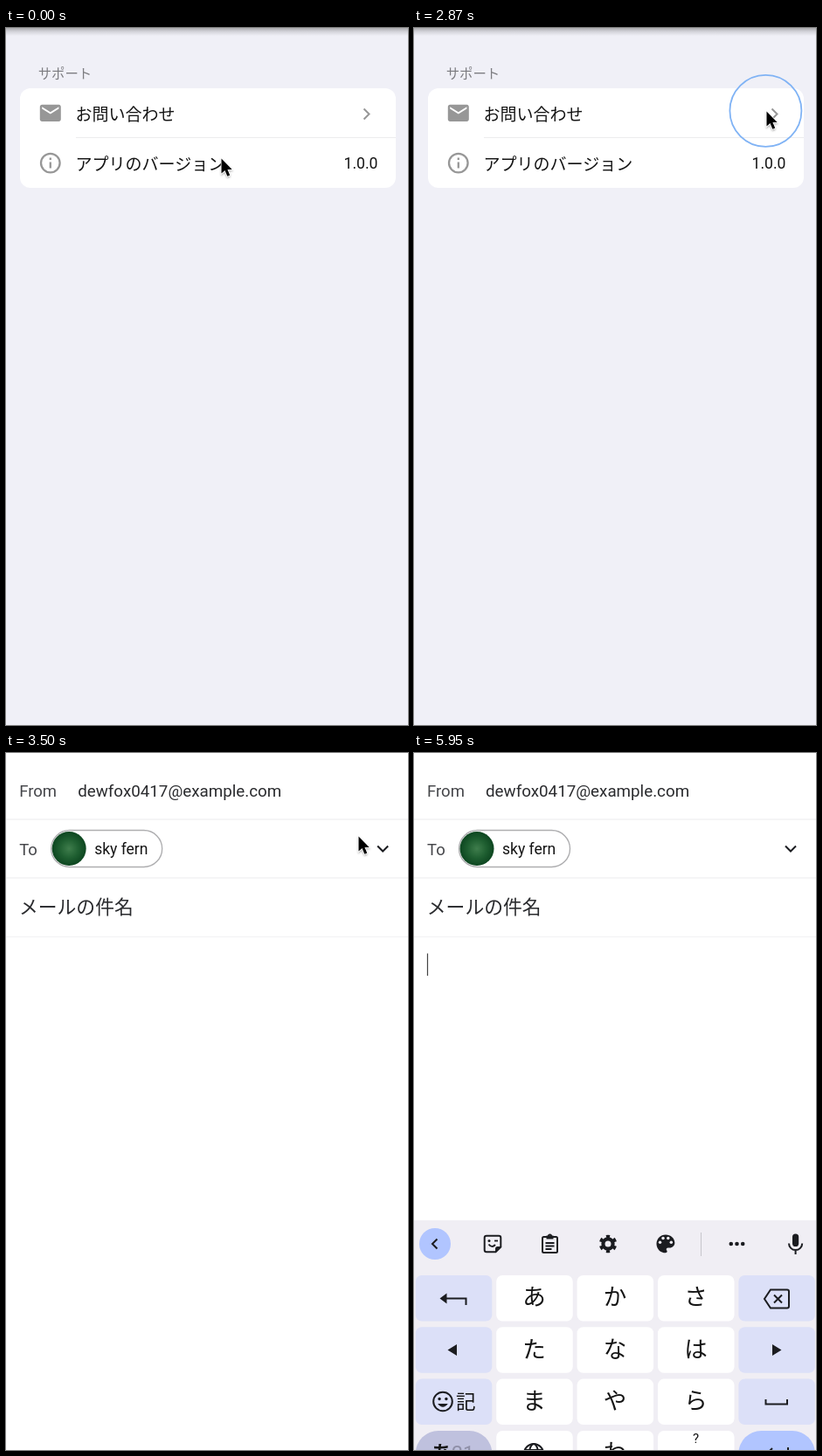
Recreate the animation shown at these times as an HTML page. Size 460 by 798 pixels, loop 6.02 s.

```html
<!DOCTYPE html>
<html lang="ja">
<head>
<meta charset="utf-8">
<title>お問い合わせ</title>
<style>
html, body { margin: 0; width: 100%; height: 100%; overflow: hidden; background: #fff; }
svg { display: block; width: 100%; height: 100%; }
text { font-family: Roboto, "Noto Sans CJK JP", "Noto Sans CJK", sans-serif; fill: #141414; }
.ink { fill: #1b1c20; }
.pen { fill: none; stroke: #1b1c20; stroke-width: 2; }
</style>
</head>
<body>
<svg viewBox="0 0 460 798" xmlns="http://www.w3.org/2000/svg">
  <defs>
    <linearGradient id="shade" x2="0" y2="1">
      <stop offset="0" stop-color="#a9a9ad"/>
      <stop offset=".45" stop-color="#d3d3d9"/>
      <stop offset="1" stop-color="#f0f0f7"/>
    </linearGradient>
    <radialGradient id="green">
      <stop offset="0" stop-color="#3f7d4c"/>
      <stop offset=".55" stop-color="#1f5f31"/>
      <stop offset="1" stop-color="#0d4620"/>
    </radialGradient>
    <filter id="soft" x="-50%" y="-50%" width="200%" height="200%">
      <feDropShadow dx="0" dy="1.5" stdDeviation="1.2" flood-opacity=".35"/>
    </filter>
  </defs>

  <rect width="460" height="798" fill="#d9d8e4"/>

  <g id="settings">
    <rect width="465" height="798" fill="#f0f0f7"/>
    <rect width="465" height="9" fill="url(#shade)"/>
    <text x="36.7" y="57.5" font-size="15.4" style="fill:#7c7c80">サポート</text>
    <rect x="16" y="69" width="430" height="114" rx="12" fill="#fff"/>
    <path d="M80 125.5H446" stroke="#ececee"/>
    <path transform="translate(36.4 83) scale(1.2)" fill="#979797"
      d="M20 4H4C2.9 4 2 4.9 2 6v12c0 1.1.9 2 2 2h16c1.1 0 2-.9 2-2V6c0-1.1-.9-2-2-2zm0 4l-8 5-8-5V6l8 5 8-5z"/>
    <g fill="none" stroke="#979797" stroke-width="2.3">
      <circle cx="50.8" cy="154.6" r="10.8"/>
      <path d="M50.8 153.4v7.2M50.8 148.6v2.4"/>
      <path d="M409.5 92.5l6 6-6 6" stroke-width="2"/>
    </g>
    <text x="79.6" y="106" font-size="19">お問い合わせ</text>
    <text x="79.6" y="163" font-size="19">アプリのバージョン</text>
    <text x="425.5" y="161" font-size="17.6" text-anchor="end">1.0.0</text>
  </g>

  <g id="mail">
    <rect width="460" height="798" fill="#fff"/>
    <g id="form">
      <path d="M0 76H460M0 143H460" stroke="#ebebed"/>
      <path d="M0 210.5H460" stroke="#f2f2f3"/>
      <text x="15" y="50" font-size="18.5" style="fill:#45464a">From</text>
      <text x="82" y="50" font-size="18.8" style="fill:#2a2b2e">dewfox0417@example.com</text>
      <text x="15" y="117" font-size="18.5" style="fill:#45464a">To</text>
      <rect x="51.5" y="88.5" width="127" height="42" rx="21" fill="#fff" stroke="#aeaeb0" stroke-width="1.4"/>
      <circle cx="72" cy="109.5" r="19.5" fill="url(#green)"/>
      <text x="101" y="115.5" font-size="17.5">sky fern</text>
      <path d="M425 106.5l6 6 6-6" class="pen"/>
      <text x="14.8" y="184" font-size="21.8" style="fill:#2a2b2e">メールの件名</text>
      <path id="caret" d="M15.5 229.5V255" stroke="#444" stroke-width="1.2"/>
    </g>
    <g id="board">
      <rect y="535" width="460" height="263" fill="#f0eef4"/>
      <circle cx="24" cy="562" r="18" fill="#b1c5ff"/>
      <path d="M26.5 556.5l-5.500 5.500 5.500 5.500" class="pen"/>
      <g transform="translate(90 562)" class="pen">
        <path d="M-7-9.300H7q2.300 0 2.300 2.300V3.500L3.500 9.300H-7q-2.300 0-2.300-2.300V-7q0-2.300 2.300-2.300z"/>
        <path d="M9.300 3H5.500Q3 3 3 5.500V9.300z" class="ink" stroke="none"/>
        <path d="M-4.500 .5Q-1 5 3 1" stroke-width="2"/>
        <path d="M2-3.500h4" stroke-width="1.800"/>
        <circle cx="-4" cy="-3.500" r="1.500" class="ink" stroke="none"/>
      </g>
      <g transform="translate(155.500 562)" class="pen">
        <rect x="-8.500" y="-8" width="17" height="18" rx="1.500"/>
        <path d="M-4-7.500h8" stroke-width="4"/>
        <circle cy="-9" r="1.500"/>
        <path d="M-5-1H5M-5 2.500H5M-5 6H2" stroke-width="1.800"/>
      </g>
      <g transform="translate(222 562)" class="pen">
        <circle r="5.600" stroke-width="4.200"/>
        <circle r="8.400" stroke-width="3.800" pathLength="60" stroke-dasharray="4.600 5.400" stroke-dashoffset="-2.700"/>
      </g>
      <g transform="translate(274 548) scale(1.16)">
        <path class="ink" d="M12 3c-4.970 0-9 4.030-9 9s4.030 9 9 9c.83 0 1.500-.67 1.500-1.500 0-.39-.15-.74-.39-1.010-.23-.26-.38-.61-.38-.99 0-.83.67-1.500 1.500-1.500H16c2.760 0 5-2.240 5-5 0-4.420-4.030-8-9-8z"/>
        <g fill="#f0eef4">
          <circle cx="6.500" cy="10.500" r="1.500"/><circle cx="9.500" cy="6.500" r="1.500"/>
          <circle cx="14.500" cy="6.500" r="1.500"/><circle cx="17.500" cy="10.500" r="1.500"/>
        </g>
      </g>
      <path d="M328.500 549v27" stroke="#c6c5cb"/>
      <g class="ink">
        <circle cx="362.800" cy="562" r="2.300"/><circle cx="369.500" cy="562" r="2.300"/><circle cx="376.200" cy="562" r="2.300"/>
        <rect x="433" y="550.500" width="7.200" height="14.500" rx="3.600"/>
      </g>
      <path d="M429 561.500a7.600 7.600 0 0 0 15.200 0M436.600 569v5" class="pen"/>
      <g id="keys"></g>
      <path d="M34 624.500H59.500v7.500" class="pen"/>
      <path class="ink" d="M29.500 624.500l8-6v12zM38.500 683.500l10.500-6.500v13zM420.500 683.500l-10.500-6.500v13z"/>
      <path d="M408 614.500h19q2 0 2 2v17q0 2-2 2h-19l-7-10.500zM412 620.500l9 9M421 620.500l-9 9" class="pen"/>
      <path d="M402.500 740v5.500h24.500V740" class="pen"/>
      <g transform="translate(33 742.500)">
        <circle r="10.800" class="pen"/>
        <path d="M-5.800 2.500Q0 10 5.800 2.500z" class="ink"/>
        <circle cx="-3.900" cy="-3" r="1.700" class="ink"/><circle cx="3.900" cy="-3" r="1.700" class="ink"/>
      </g>
      <text x="48" y="751" font-size="22.500">記</text>
      <text x="20" y="810" font-size="23" font-weight="700">あ<tspan style="fill:#8f90a8;font-weight:400">21</tspan></text>
      <g transform="translate(137 802)" class="pen">
        <circle r="11"/><ellipse rx="5" ry="11"/><path d="M-10-4H10"/>
      </g>
      <text x="322.500" y="790" font-size="15" text-anchor="middle">?</text>
      <text x="322" y="811" font-size="18" text-anchor="middle" style="fill:#9a9a9e">。、 !</text>
      <path d="M428 795v8H404m6-7l-7 7 7 7" class="pen"/>
    </g>
  </g>

  <circle id="ring" r="41" fill="none" stroke="#80b3f5" stroke-width="1.8"/>
  <g id="mouse">
    <path transform="translate(.5 1.5) scale(.95)" filter="url(#soft)" fill="#000" stroke="#fff" stroke-width="1.3" paint-order="stroke"
      d="M0 0V18L4.200 14.200 7.200 21.200 10.200 19.900 7.300 13.100H12.800Z"/>
  </g>
</svg>
<script>
const LOOP = 6020, TICK = 70;
const $ = id => document.getElementById(id);

// keyboard keys: three kana columns between two coloured ones
const kana = ['あかさ', 'たなは', 'まやら', 'わ'];
let keys = '';
for (let row = 0; row < 4; row++) {
  for (let col = 0; col < 5; col++) {
    const x = 1.8 + col * 92.4, y = 598 + row * 59.3;
    const side = col % 4 === 0, pill = side && row === 3;
    const fill = pill ? (col ? '#b1c5ff' : '#bfc1de') : side ? '#dce0f8' : '#fff';
    keys += `<rect x="${x}" y="${y}" width="87.5" height="52.5" rx="${pill ? 26 : 7}" fill="${fill}"/>`;
    const ch = row < 3 ? kana[row][col - 1] : col === 2 ? kana[3] : '';
    if (ch) keys += `<text x="${x + 43.4}" y="${y + 34.3}" font-size="26.5" text-anchor="middle">${ch}</text>`;
  }
}
$('keys').innerHTML = keys;

const clamp = p => Math.min(1, Math.max(0, p));

function bezier(x1, y1, x2, y2) {
  const at = (a, b, u) => 3 * a * u * (1 - u) ** 2 + 3 * b * u * u * (1 - u) + u ** 3;
  return p => {
    let lo = 0, hi = 1;
    for (let i = 0; i < 24; i++) {
      const mid = (lo + hi) / 2;
      if (at(x1, x2, mid) < p) lo = mid; else hi = mid;
    }
    return at(y1, y2, lo);
  };
}
const speedUp = bezier(.3, 0, .8, .15), slowDown = bezier(.05, .7, .1, 1);
const smooth = bezier(.35, 0, .4, 1), easeOut = bezier(.1, .6, .2, 1);

// push: 40 % of the way in the first sixth of the time
const push = p => p <= 0 ? 0 : p >= 1 ? 1
  : p < 1 / 6 ? .4 * speedUp(p * 6)
  : .4 + .6 * slowDown((p - 1 / 6) * 1.2);

// time, x, y of the pointer tip
const path = [
  [0, 246, 148], [630, 386, 100], [910, 387, 98], [1330, 387, 98], [1540, 387, 91],
  [1680, 391, 91], [1820, 402, 101], [1960, 397, 94], [2520, 397, 94], [2730, 403, 94],
  [4690, 403, 94], [5250, 432, -34]
];
function pointer(t) {
  const i = path.findIndex(k => k[0] > t);
  if (i < 0) return path[path.length - 1].slice(1);
  const [t0, x0, y0] = path[i - 1], [t1, x1, y1] = path[i];
  const p = smooth((t - t0) / (t1 - t0));
  return [x0 + (x1 - x0) * p, y0 + (y1 - y0) * p];
}

const within = (t, spans) => spans.some(([a, b]) => t >= a && t < b);
const show = (id, on) => $(id).setAttribute('visibility', on ? 'inherit' : 'hidden');
const move = (id, x, y) => $(id).setAttribute('transform', `translate(${x.toFixed(2)} ${y.toFixed(2)})`);

function draw(t) {
  const shift = 488 * push((t - 2990) / 540);
  move('settings', -shift, 0);
  move('mail', 488 - shift, 0);
  show('form', t >= 3430);
  show('caret', within(t, [[4620, 5110], [5670, LOOP]]));
  move('board', 0, 264 * (1 - easeOut(clamp((t - 3640) / 350))));
  show('board', t >= 3640);
  const [x, y] = pointer(t);
  move('mouse', x, y);
  move('ring', x - .6, y + .8);
  show('ring', within(t, [[1400, 2100], [2870, 3150]]));
}

const start = performance.now();
function frame() {
  const t = Math.max(0, performance.now() - start) % LOOP;
  draw(Math.floor(t / TICK) * TICK);
  requestAnimationFrame(frame);
}
frame();
</script>
</body>
</html>
```
